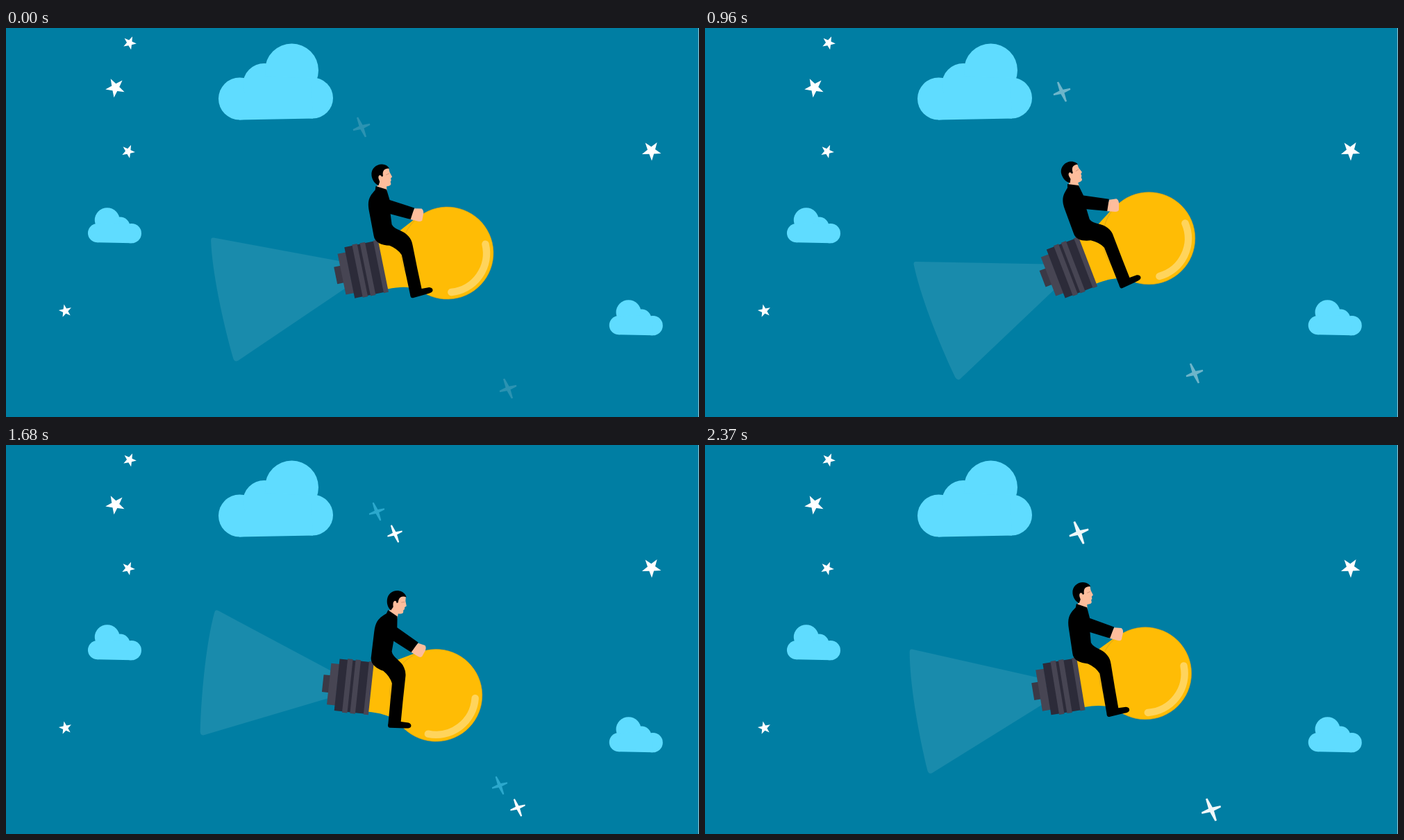
An HTML page for the animation above (2.4 s loop, 998 by 561 pixels).

```html
<!DOCTYPE html>
<html lang="en">
<head>
<meta charset="utf-8">
<title>Riding a bright idea</title>
<style>
  html, body { margin: 0; width: 100%; height: 100%; overflow: hidden; background: #007ea3; }
  svg { display: block; width: 998px; height: 561px; }
</style>
</head>
<body>
<svg viewBox="0 0 998 561">
  <defs>
    <g id="cloud" fill="#5fdcff">
      <circle cx="336.5" cy="102" r="30.5"/>
      <circle cx="372" cy="82" r="31"/>
      <circle cx="411.5" cy="61" r="38.5"/>
      <circle cx="441.5" cy="101" r="29.5"/>
      <path d="M336 132.5L442 130.5L440 72L372 70L336 100Z"/>
    </g>
    <path id="sparkle" d="M-5.500 -16.500L1.800 -3.600L13.500 -6L14 -3.500L4 1.600L8 15.500L5.500 16.500L-1.800 3.600L-13.500 6L-14 3.500L-4 -1.600L-8 -15.500Z"/>
  </defs>
  <rect width="998" height="561" fill="#007ea3"/>
  <rect x="997" width="1" height="561" fill="#8fc6d6"/>
  <use href="#cloud"/>
  <use href="#cloud" transform="translate(337.9 248.8) scale(-.467 .464)"/>
  <use href="#cloud" transform="translate(1088.7 381.8) scale(-.467 .464)"/>
  <g id="stars" fill="#fff"></g>
  <g id="sparkles"></g>

  <g id="flight">
    <path fill="#198bac" d="M474 330L302 255Q298 253 297 258C289 300 287 370 290 431Q291 437 296 435.500L474 367Z"/>
    <!-- bulb -->
    <path fill="#ffbc05" d="M529 315C550 314 558 309 566 305L598 290L625 352L584 405C570 390 556 384 529 383.500Z"/>
    <circle cx="624.500" cy="352.200" r="66.500" fill="#ffbc05" stroke="#c79b23" stroke-width=".6"/>
    <path d="M681 352A56.500 56.500 0 0 1 617.500 408.500" fill="none" stroke="#ffd45c" stroke-width="10.500" stroke-linecap="round"/>
    <g id="screw" transform="rotate(1.55 625 352)"></g>
    <!-- rider -->
    <path fill="#fdbd9c" d="M556 212L570 213L570 220L572 227L569.500 229L569.500 232L568 233.500L568 237Q567 239.500 561 239L560 246L547 237L551 231L551 219Z"/>
    <path d="M571 214.500C564 212.500 560 215 559.500 223L557.500 224C557 219 552 220 552.500 226L553 230L550 235C545 231 543 225 543.500 219C545 205 562 202 569 211Z"/>
    <path d="M564 222.500L569 221.500" stroke="#c98d72" stroke-width=".8"/>
    <path fill="#fdbd9c" d="M593 279L603 281.500Q605.500 284 604 289L600 298Q598 300 594 298L582 292Z"/>
    <path d="M546 235L560 243L561 259L593 278L584 293L557.500 279L556 294C558 303 571 306 575.500 316Q579 322 578.500 330L577.500 365L577 394L588 394.500Q593 396 592 400Q591 403 584 403L562 404Q558 404 559 398L560 340Q556 330 546 323C535 320 526 314 527 304L528.500 268C529 250 536 246 544 240Z"/>
  </g>
</svg>
<script>
const NS = 'http://www.w3.org/2000/svg';
const $ = id => document.getElementById(id);

function add(parent, tag, attrs) {
  const el = document.createElementNS(NS, tag);
  for (const name in attrs) el.setAttribute(name, attrs[name]);
  return parent.appendChild(el);
}

// Five-pointed stars: x, y, radius, angle of one tip
function starPoints(x, y, r, tip) {
  return Array.from({ length: 10 }, (_, i) => {
    const a = (tip + i * 36) * Math.PI / 180, d = i % 2 ? r * 0.4 : r;
    return [x + d * Math.cos(a), y + d * Math.sin(a)];
  }).join(' ');
}
for (const star of [[178, 21.5, 10, 294], [157.5, 86, 14.5, 98], [176, 178, 10, 294],
                    [85.5, 408, 9.7, 258], [929.5, 177, 14.5, 88]])
  add($('stars'), 'polygon', { points: starPoints(...star) });

// Screw base: left, width, half height, colour
const DARK = '#2c2b39', LIGHT = '#474553';
for (const [x, width, half, fill] of [
  [460.5, 11, 12.5, '#3b3946'], [469.5, 12, 30, LIGHT], [481, 48, 37.5, DARK],
  [492.5, 7.5, 39, LIGHT], [504, 7.5, 39, LIGHT], [523.5, 7, 38.5, LIGHT]
]) add($('screw'), 'rect', { x, y: 352 - half, width, height: 2 * half, fill });

// Each burst: upper x, y and lower x, y of its large sparkle
const BURSTS = [
  [512, 143, 723, 520], [524, 104, 716, 488], [514, 92, 705, 498],
  [535, 113, 688, 527], [534, 96, 711, 491], [538.5, 126.5, 729, 526]
];
const BURST_TIME = 510, BURST_LEAD = 450;
const sparkles = Array.from({ length: 4 }, () => add($('sparkles'), 'use', { href: '#sparkle' }));
const clamp = v => Math.max(0, Math.min(1, v));

function place(el, x, y, scale, opacity, fill) {
  el.setAttribute('transform', `translate(${x} ${y}) scale(${scale})`);
  el.setAttribute('opacity', opacity);
  el.setAttribute('fill', fill);
}

function drawSparkles(t) {
  const burst = BURSTS[Math.floor((t + BURST_LEAD) / BURST_TIME)];
  const p = (t + BURST_LEAD) % BURST_TIME;
  const size = p < 270 ? 0.8 + 0.2 * clamp((p - 90) / 90) : 1 - 0.12 * clamp((p - 270) / 120);
  const glow = clamp(Math.min((p - 45) / 100, (490 - p) / 235));
  for (let i = 0; i < 2; i++) {
    const x = burst[2 * i], y = burst[2 * i + 1];
    place(sparkles[2 * i], x + 26, Math.min(y + 32, 530), 0.77, clamp((210 - p) / 80), '#fff');
    place(sparkles[2 * i + 1], x, y, size, glow, p < 130 ? '#5fdcff' : '#fff');
  }
}

// Steady swing between the highest climb and the deepest dive
const CLIMB = 612, DIVE = 1815;
function tilt(t) {
  if (t < CLIMB) return -35.55 + 0.0368 * (CLIMB - t);
  if (t < DIVE) return -35.55 + 0.0375 * (t - CLIMB);
  return 9.55 - 0.0368 * (t - DIVE);
}

function draw(now) {
  const t = Math.floor(now % 2400 / 30) * 30;
  $('flight').setAttribute('transform', `rotate(${tilt(t)} 509 290.5)`);
  drawSparkles(t);
}

const start = performance.now();
function tick() {
  draw(performance.now() - start);
  requestAnimationFrame(tick);
}
tick();
</script>
</body>
</html>
```
